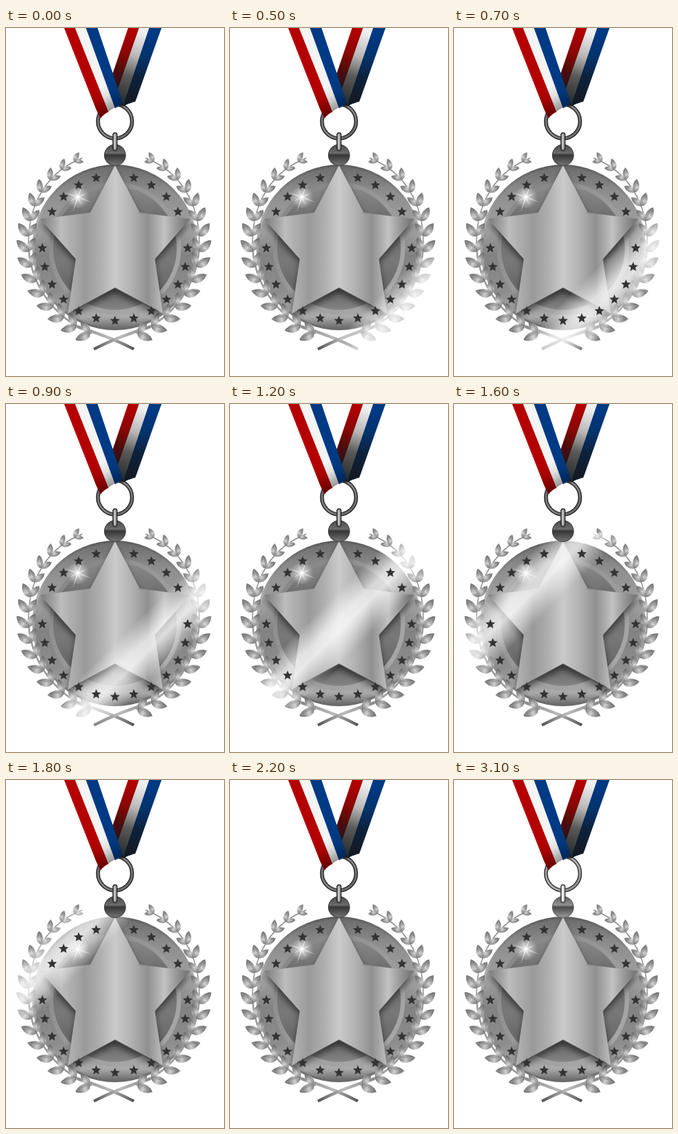
An HTML page that plays this animation: 300x479 px, repeating every 3.2 s.

```html
<!DOCTYPE html>
<html lang="en">
<head>
<meta charset="utf-8">
<title>Silver medal</title>
<style>
  html, body { margin: 0; width: 100%; height: 100%; overflow: hidden; background: #fff; }
  svg { display: block; width: 100vw; height: 100vh; }
  #band { animation: sweep 3.2s infinite; }
  #hook { animation: flash 3.2s step-end infinite; }
  @keyframes sweep {
    0% { transform: translateX(600px); animation-timing-function: step-end; }
    9.375% { transform: translateX(0); animation-timing-function: steps(19, end); }
    68.749% { transform: translateX(-456px); animation-timing-function: step-end; }
    68.75%, 100% { transform: translateX(-900px); animation-timing-function: step-end; }
  }
  @keyframes flash {
    0% { filter: brightness(1); }
    96.875%, 100% { filter: brightness(1.35); }
  }
</style>
</head>
<body>
<svg viewBox="0 0 300 479" preserveAspectRatio="none">
  <defs>
    <linearGradient id="rim" x1="0" y1="0" x2="0" y2="1">
      <stop offset="0" stop-color="#6c6c6c"/><stop offset=".15" stop-color="#8c8c8c"/>
      <stop offset=".38" stop-color="#a2a2a2"/><stop offset=".55" stop-color="#828282"/>
      <stop offset=".78" stop-color="#8e8e8e"/><stop offset=".93" stop-color="#aaa"/>
      <stop offset="1" stop-color="#6c6c6c"/>
    </linearGradient>
    <linearGradient id="edge" x1="0" y1="0" x2="0" y2="1">
      <stop offset="0" stop-color="#5c5c5c"/><stop offset=".35" stop-color="#b0b0b0"/>
      <stop offset=".7" stop-color="#969696"/><stop offset="1" stop-color="#6a6a6a"/>
    </linearGradient>
    <linearGradient id="bevel" x1="0" y1="0" x2="1" y2="1">
      <stop offset="0" stop-color="#808080"/><stop offset=".5" stop-color="#9a9a9a"/>
      <stop offset="1" stop-color="#acacac"/>
    </linearGradient>
    <linearGradient id="pit" x1="0" y1="0" x2="0" y2="1">
      <stop offset="0" stop-color="#8a8a8a"/><stop offset=".3" stop-color="#6a6a6a"/>
      <stop offset=".6" stop-color="#787878"/><stop offset=".85" stop-color="#666"/>
      <stop offset="1" stop-color="#848484"/>
    </linearGradient>
    <linearGradient id="face">
      <stop offset="0" stop-color="#787878"/><stop offset=".14" stop-color="#bcbcbc"/>
      <stop offset=".3" stop-color="#9a9a9a"/><stop offset=".4" stop-color="#aeaeae"/>
      <stop offset=".5" stop-color="#cacaca"/><stop offset=".6" stop-color="#b4b4b4"/>
      <stop offset=".72" stop-color="#909090"/><stop offset=".83" stop-color="#c2c2c2"/>
      <stop offset=".92" stop-color="#929292"/><stop offset="1" stop-color="#6e6e6e"/>
    </linearGradient>
    <linearGradient id="leafA">
      <stop offset="0" stop-color="#6c6c6c"/><stop offset=".4" stop-color="#cfcfcf"/>
      <stop offset=".75" stop-color="#868686"/><stop offset="1" stop-color="#6a6a6a"/>
    </linearGradient>
    <linearGradient id="leafB">
      <stop offset="0" stop-color="#8c8c8c"/><stop offset=".4" stop-color="#a8a8a8"/>
      <stop offset="1" stop-color="#606060"/>
    </linearGradient>
    <linearGradient id="stem" gradientUnits="userSpaceOnUse" x1="100" y1="0" x2="176" y2="0">
      <stop offset="0" stop-color="#8a8a8a"/><stop offset=".55" stop-color="#bbb"/>
      <stop offset="1" stop-color="#555"/>
    </linearGradient>
    <linearGradient id="ball" x1="0" y1="0" x2="0" y2="1">
      <stop offset="0" stop-color="#444"/><stop offset=".4" stop-color="#6c6c6c"/>
      <stop offset=".5" stop-color="#363636"/><stop offset="1" stop-color="#777"/>
    </linearGradient>
    <linearGradient id="ringTone" x1="0" y1="0" x2="1" y2="1">
      <stop offset="0" stop-color="#666"/><stop offset=".5" stop-color="#8a8a8a"/>
      <stop offset="1" stop-color="#666"/>
    </linearGradient>
    <linearGradient id="dark" gradientUnits="userSpaceOnUse" x1="195" y1="8" x2="165" y2="100">
      <stop offset="0" stop-color="#151515" stop-opacity="0"/>
      <stop offset=".35" stop-color="#151515" stop-opacity=".25"/>
      <stop offset=".65" stop-color="#151515" stop-opacity=".68"/>
      <stop offset="1" stop-color="#151515" stop-opacity=".88"/>
    </linearGradient>
    <linearGradient id="fold" gradientUnits="userSpaceOnUse" x1="134" y1="80" x2="147" y2="114">
      <stop offset="0" stop-opacity="0"/><stop offset=".4" stop-opacity=".08"/>
      <stop offset="1" stop-opacity=".42"/>
    </linearGradient>
    <linearGradient id="shine" gradientUnits="userSpaceOnUse" x1="311" y1="311" x2="363" y2="363">
      <stop offset="0" stop-color="#fff" stop-opacity="0"/>
      <stop offset=".38" stop-color="#fff" stop-opacity=".7"/>
      <stop offset=".55" stop-color="#fff" stop-opacity=".76"/>
      <stop offset="1" stop-color="#fff" stop-opacity="0"/>
    </linearGradient>
    <radialGradient id="glow">
      <stop offset="0" stop-color="#fff" stop-opacity=".9"/>
      <stop offset=".35" stop-color="#fff" stop-opacity=".5"/>
      <stop offset="1" stop-color="#fff" stop-opacity="0"/>
    </radialGradient>
    <filter id="soft" x="-20%" y="-20%" width="140%" height="140%"><feGaussianBlur stdDeviation="4"/></filter>
    <clipPath id="lower"><rect y="178" width="300" height="301"/></clipPath>
    <clipPath id="disc"><circle cx="150" cy="302" r="111"/></clipPath>
    <path id="star" d="M150 189L184 254L253 263L205 318L216 393L150 358L85 393L96 318L47 263L116 254Z"/>
    <g id="leaf">
      <path d="M0 0C4 -9 15 -8 23 0Z" fill="url(#leafA)"/>
      <path d="M0 0C6 7 16 6 23 0Z" fill="url(#leafB)"/>
    </g>
  </defs>

  <circle cx="150" cy="302" r="114" fill="url(#edge)"/>
  <circle cx="150" cy="302" r="111" fill="url(#rim)"/>
  <circle cx="150" cy="303" r="91" fill="url(#bevel)"/>
  <circle cx="150" cy="303" r="85" fill="url(#pit)"/>

  <g id="sprig" fill="none">
    <path id="vine" d="M105 179C58 197 31 240 31 295C31 355 70 402 118 420" stroke="#8a8a8a" stroke-width="1.4"/>
    <path d="M31 295C31 355 70 402 118 420" stroke="#999" stroke-width="2.4"/>
    <path d="M98 411Q143 425 176 442" stroke="url(#stem)" stroke-width="4"/>
  </g>
  <use href="#sprig" transform="translate(297 0) scale(-1 1)"/>

  <g clip-path="url(#disc)">
    <use href="#star" y="6" filter="url(#soft)" opacity=".5"/>
  </g>
  <use href="#star" fill="url(#face)"/>
  <path d="M92 389.500L150 358L209 389.500" fill="none" stroke="#4a4a4a" stroke-width="1.200"/>

  <g transform="translate(99 233)" fill="#fff">
    <circle r="16" fill="url(#glow)"/>
    <g id="rays"></g>
  </g>

  <g clip-path="url(#lower)">
    <rect id="band" x="-400" y="170" width="1700" height="300" fill="url(#shine)"/>
  </g>

  <g id="studs" fill="#333"></g>

  <g id="hook" fill="none">
    <circle cx="150" cy="175" r="15" fill="url(#ball)"/>
    <circle cx="150" cy="175" r="14.500" stroke="#444"/>
    <circle cx="150" cy="128.500" r="23.500" stroke="#2c2c2c" stroke-width="5.400"/>
    <circle cx="150" cy="128.500" r="23.500" stroke="url(#ringTone)" stroke-width="2.400"/>
    <g stroke-linecap="round">
      <path d="M150 147V166" stroke="#333" stroke-width="7"/>
      <path d="M150 147V166" stroke="#999" stroke-width="4"/>
      <path d="M149.500 147V165" stroke="#ccc" stroke-width="1.500"/>
    </g>
  </g>

  <g>
    <path d="M168 0H184L147 104H133Z" fill="#b40000"/>
    <path d="M183 0H198L163 106L147 104Z" fill="#f0f0f0"/>
    <path d="M197 0H214L178 101L161 107Z" fill="#003a84"/>
    <path d="M168 0H214L178 101Q169 103 161 108L133 104Z" fill="url(#dark)"/>
  </g>
  <g>
    <path d="M80 0H96L142 115Q135 118 130 124L124 112Z" fill="#b40000"/>
    <path d="M95 0H111L151 110Q146 112 141 115.500Z" fill="#f4f4f4"/>
    <path d="M110 0H126L161 104Q156 107 150 110.500Z" fill="#003a84"/>
    <path d="M80 0H126L161 104Q140 113 130 124L124 112Z" fill="url(#fold)"/>
  </g>
</svg>
<script>
  const NS = 'http://www.w3.org/2000/svg';
  const byId = id => document.getElementById(id);
  const add = (parent, tag, attrs) => {
    const el = document.createElementNS(NS, tag);
    for (const k in attrs) el.setAttribute(k, attrs[k]);
    parent.appendChild(el);
  };

  const vine = byId('vine');
  const total = vine.getTotalLength();
  const pairs = 15;
  for (let i = 0; i < pairs; i++) {
    const u = i / (pairs - 1);
    const at = 12 + u * (total - 14);
    const p = vine.getPointAtLength(at);
    const q = vine.getPointAtLength(at - 2);
    const grow = Math.atan2(q.y - p.y, q.x - p.x) * 180 / Math.PI;
    const size = Math.min(1, 0.62 + u * 0.9);
    for (const [turn, k] of [[-38 - 10 * u, 1], [28, 0.9]]) {
      add(byId('sprig'), 'use', {
        href: '#leaf',
        transform: `translate(${p.x} ${p.y}) rotate(${grow + turn}) scale(${size * k})`
      });
    }
  }

  const starPoints = r => Array.from({ length: 10 }, (_, i) => {
    const a = i * Math.PI / 5;
    const d = i % 2 ? r * 0.45 : r;
    return `${d * Math.sin(a)},${-d * Math.cos(a)}`;
  }).join(' ');

  for (let deg = 15; deg < 360; deg += 15) {
    if (deg === 75 || deg === 285) continue;
    const a = deg * Math.PI / 180;
    add(byId('studs'), 'polygon', {
      points: starPoints(7),
      transform: `translate(${150 + 100 * Math.sin(a)} ${303 - 100 * Math.cos(a)})`
    });
  }

  for (let i = 0; i < 8; i++) {
    const len = i % 2 ? 13 : 21;
    add(byId('rays'), 'path', {
      d: `M0 -1.1L${len} 0L0 1.1Z`,
      opacity: 0.55,
      transform: `rotate(${i * 45 + 20})`
    });
  }
</script>
</body>
</html>
```
